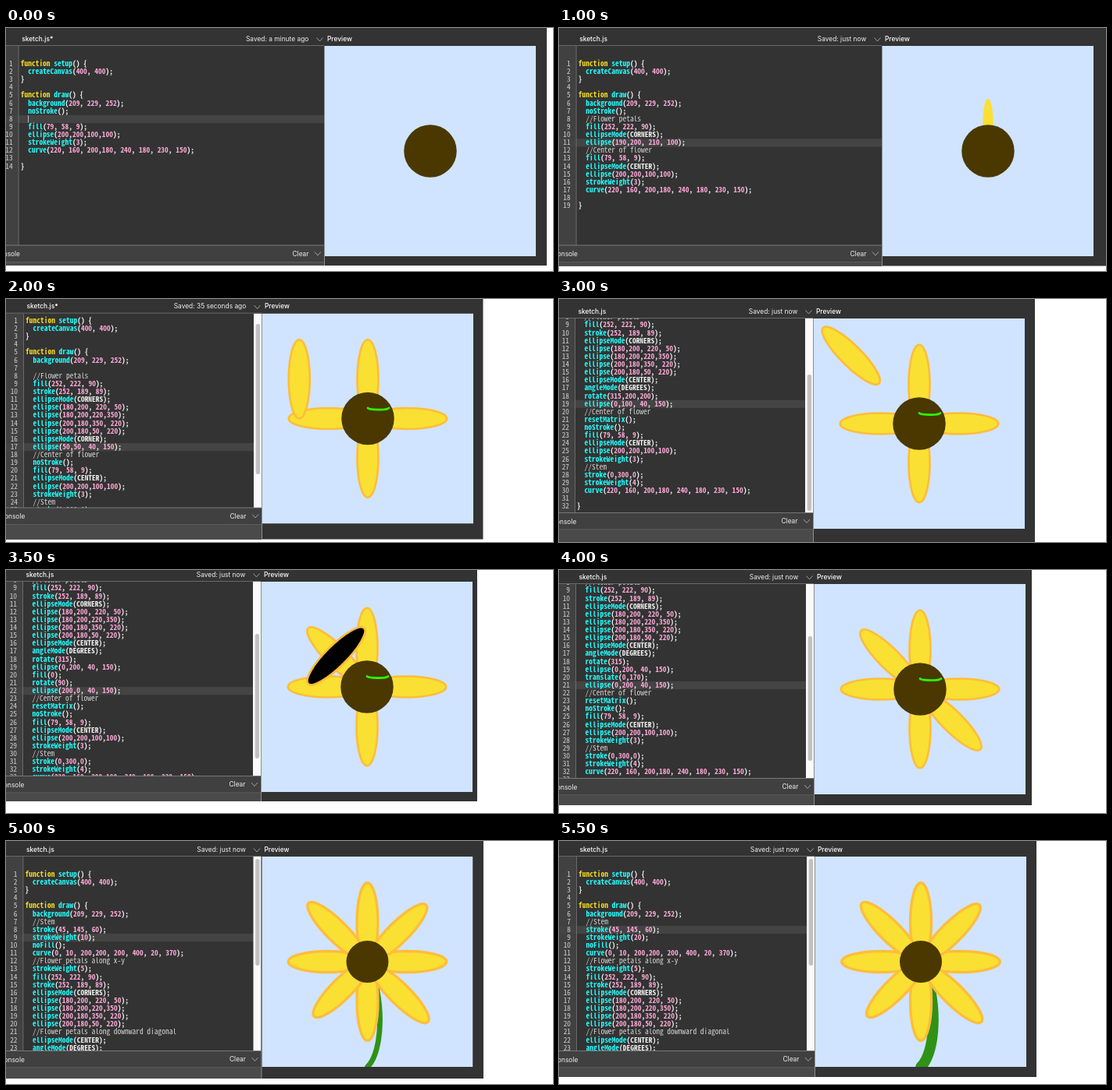
Write an HTML page that moves like this. It is 700 px wide and 312 px high and loops after 6 s.

```html
<!DOCTYPE html>
<html lang="en">
<head>
<meta charset="utf-8">
<title>Flower sketch</title>
<style>
html, body { margin: 0; width: 100%; height: 100%; overflow: hidden; background: #fff; }
#stage {
  --mono: "Noto Sans Mono CJK JP", "Noto Sans Mono CJK SC", "Noto Sans Mono", monospace;
  display: block; width: 700px; height: 312px;
}
.step { visibility: hidden; animation: show 6s step-end infinite; }
@keyframes show {
  0% { visibility: visible; }
  8.3334%, 100% { visibility: hidden; }
}
text { font: 8.4px Inter, "Open Sans", sans-serif; fill: #f0f0f0; }
.title { font-weight: 500; fill: #fff; }
.code, .num { font-family: var(--mono); font-size: var(--size); }
.code { font-weight: 700; }
.num { fill: #d0d0d0; }
.word { fill: #f5dc23; }
.call { fill: #2ff; }
.value { fill: #ffa9d9; }
.note { fill: #d8d8d8; font-weight: 400; }
</style>
</head>
<body>
<svg id="stage" viewBox="0 0 700 312"></svg>
<script>
const PITCH = 10.125, CHAR = 4.725, PANE = 270;
const stage = document.getElementById('stage');

// Colours as the screen shows them
const SHOWN = {
  '209,229,252': '#d0e4ff', '252,222,90': '#fae033', '252,189,89': '#ffbd3b',
  '79,58,9': '#4a3800', '0,300,0': '#2cff00', '45,145,60': '#2f9217', '0': '#000'
};

// Sketch fragments
const yellow = 'fill(252, 222, 90);';
const edge = 'stroke(252, 189, 89);\nellipseMode(CORNERS);';
const cross = ['ellipse(180,200, 220, 50);', 'ellipse(180,200,220,350);',
  'ellipse(200,180,350, 220);', 'ellipse(200,180,50, 220);'];
const petals = ['', '//Flower petals', yellow, edge];
const centerMode = 'ellipseMode(CENTER);';
const degrees = centerMode + '\nangleMode(DEGREES);';
const diagonal = 'ellipse(0,200, 40, 150);';
const heart = size => ['noStroke();', 'fill(79, 58, 9);', centerMode, `ellipse(200,200,${size},${size});`];
const middle = '//Center of flower';
const smile = 'curve(220, 160, 200,180, 240, 180, 230, 150);';
const tail = ['strokeWeight(3);', '//Stem', 'stroke(0,300,0);', 'strokeWeight(4);', smile];
const endTurned = size => [middle, 'resetMatrix();', ...heart(size)];
const down = [degrees, 'rotate(315);', diagonal, 'translate(0,170);', diagonal];
const up = ['translate(100,100);', '//Flower petals along upward diagonal', 'rotate(90);',
  'translate(15,20)', 'ellipse(0,0, 40, 150);', 'ellipse(0,150, 40, 150);'];
const downNote = '//Flower petals along downward diagonal';
const early = (...mid) => ['noStroke();', ...mid, 'ellipse(200,200,100,100);', 'strokeWeight(3);', smile];
const stem = weight => ['//Stem', 'stroke(45, 145, 60);', `strokeWeight(${weight});`, 'noFill();',
  'curve(0, 10, 200,200, 200, 400, 20, 370);', '//Flower petals along x-y', 'strokeWeight(5);',
  yellow, edge, ...cross, downNote, ...down, ...up, ...endTurned(80)];

// x, y: corner of the preview; w, h: window size; bar: scroll thumb top and height
const steps = [
  { x: 408, y: 23, w: 692, h: 305, on: 8, caret: true, saved: 'a minute ago',
    body: early('', 'fill(79, 58, 9);') },
  { x: 413, y: 26, w: 699, h: 311, on: 10, saved: 'just now',
    body: early('//Flower petals', yellow, 'ellipse(200,100, 20, 100);', middle, 'fill(79, 58, 9);') },
  { x: 414, y: 23, w: 700, h: 305.5, on: 11, saved: 'just now',
    body: early('//Flower petals', yellow, 'ellipseMode(CORNERS);', 'ellipse(190,200, 210, 100);',
      middle, 'fill(79, 58, 9);', centerMode) },
  { x: 328, y: 20, w: 608, h: 304, on: 14, scroll: 13.5, bar: [13.5, 203], saved: 'just now',
    body: [...petals, ...cross.slice(0, 3), middle, ...heart(100), ...tail] },
  { x: 328, y: 18.5, w: 610.5, h: 308.5, on: 17, scroll: 13.5, bar: [13.5, 193], saved: '35 seconds ago',
    body: [...petals, ...cross, 'ellipseMode(CORNER);', 'ellipse(50,50, 40, 150);',
      middle, ...heart(100), ...tail] },
  { x: 327, y: 20, w: 608, h: 304, on: 19, scroll: 95.5, bar: [72, 175], saved: 'just now',
    body: [...petals, ...cross, degrees, 'rotate(315);', 'ellipse(50,50, 40, 150);',
      ...endTurned(100), ...tail] },
  { x: 326, y: 25, w: 609, h: 312, on: 19, scroll: 95.5, bar: [72, 175], saved: 'just now',
    body: [...petals, ...cross, degrees, 'rotate(315,200,200);', 'ellipse(0,100, 40, 150);',
      ...endTurned(100), ...tail] },
  { x: 327, y: 15, w: 603, h: 297, on: 22, scroll: 95.5, bar: [67, 160], saved: 'just now',
    body: [...petals, ...cross, degrees, 'rotate(315);', diagonal, 'fill(0);', 'rotate(90);',
      'ellipse(200,0, 40, 150);', ...endTurned(100), ...tail] },
  { x: 327, y: 18, w: 605, h: 302, on: 21, scroll: 95.5, bar: [67, 160], saved: 'just now',
    body: [...petals, ...cross, ...down, ...endTurned(100), ...tail] },
  { x: 326.5, y: 20, w: 612.5, h: 304.5, on: 39, scroll: 177, bar: [104, 137], saved: 'just now',
    body: [...petals, ...cross, downNote, ...down, ...up, ...endTurned(90), ...tail] },
  { x: 327.5, y: 20, w: 611, h: 305, on: 9, scroll: 0, bar: [3, 137], saved: 'just now', body: stem(10) },
  { x: 328, y: 20, w: 611, h: 303, on: 8, scroll: 0, bar: [3, 137], saved: 'just now', body: stem(20) }
];

const rect = (x, y, w, h, fill, more = '') =>
  `<rect x="${x}" y="${y}" width="${w}" height="${h}" fill="${fill}" ${more}/>`;
const label = (x, y, str, more = '') => `<text x="${x}" y="${y}" ${more}>${str}</text>`;
const chevron = (x, y) =>
  `<path d="M${x - 4} ${y - 2}l4 4.5 4-4.5" fill="none" stroke="#aaa" stroke-width=".9"/>`;

function listing(body) {
  const inner = body.join('\n').split('\n').map(s => s && '  ' + s);
  return ['function setup() {', '  createCanvas(400, 400);', '}', '', 'function draw() {',
    '  background(209, 229, 252);', ...inner, '', '}'];
}

// Runs the listed drawing calls; style carries over from the previous pass
function paint(lines) {
  const pen = { fill: '#fff', stroke: 'none', weight: 1, mode: 'CENTER' };
  let out, turn;
  const style = () => `fill="${pen.fill}" stroke="${pen.stroke}" stroke-width="${pen.weight}" transform="${turn}"`;
  const calls = {
    background: (...c) => { out = rect(0, 0, 400, 400, SHOWN[c]); },
    fill: (...c) => { pen.fill = SHOWN[c]; },
    stroke: (...c) => { pen.stroke = SHOWN[c]; },
    noFill: () => { pen.fill = 'none'; },
    noStroke: () => { pen.stroke = 'none'; },
    strokeWeight: w => { pen.weight = w; },
    rotate: a => { turn += `rotate(${a})`; },
    translate: (x, y) => { turn += `translate(${x} ${y})`; },
    resetMatrix: () => { turn = ''; },
    ellipse: (a, b, c, d) => {
      if (pen.mode === 'CORNERS') [a, b, c, d] = [(a + c) / 2, (b + d) / 2, Math.abs(c - a), Math.abs(d - b)];
      if (pen.mode === 'CORNER') { a += c / 2; b += d / 2; }
      out += `<ellipse cx="${a}" cy="${b}" rx="${c / 2}" ry="${d / 2}" ${style()}/>`;
    },
    curve: (a, b, c, d, e, f, g, h) => {
      out += `<path d="M${c} ${d}C${c + (e - a) / 6} ${d + (f - b) / 6} ${e - (g - c) / 6} ${f - (h - d) / 6} ${e} ${f}" stroke-linecap="round" ${style()}/>`;
    }
  };
  for (let pass = 0; pass < 2; pass++) {
    turn = '';
    for (const line of lines) {
      const [, name, args] = line.match(/^\s+(\w+)\((.*)\)/) || [];
      if (name === 'ellipseMode') pen.mode = args;
      else if (calls[name]) calls[name](...(args ? args.split(',').map(Number) : []));
    }
  }
  return out;
}

function tint(token) {
  if (token.startsWith('//')) return 'note';
  if (token === 'function') return 'word';
  if (/^\d/.test(token)) return 'value';
  return /^[a-z]/.test(token) ? 'call' : '';
}

const colour = line => line.trim().replace(/\/\/.*|\w+/g,
  token => `<tspan class="${tint(token)}">${token}</tspan>`);

function editor(s, lines, left, height) {
  const right = s.x - 1;
  const mid = n => 23 + PITCH * (n - 1) - (s.scroll || 0);
  let out = rect(0, 0, left, height, '#414141');
  out += rect(0, mid(s.on) - 5, right, PITCH, '#444');
  out += rect(left - .5, 0, .8, height, '#777');
  lines.forEach((line, i) => {
    const y = mid(i + 1);
    if (y < -8 || y > height + 8) return;
    const indent = line.length - line.trimStart().length;
    out += label(left - 7.4, y + 2.9, i + 1, 'class="num" text-anchor="end"');
    out += label(left + 2.6 + indent * CHAR, y + 2.9, colour(line), 'class="code"');
  });
  if (s.caret) out += rect(left + 12, mid(s.on) - 4.5, .8, 9, '#ddd');
  if (s.bar) {
    out += rect(right - 10, 0, 10, height, '#fafafa');
    out += rect(right - 7.3, s.bar[0], 5.4, s.bar[1], '#c1c1c1', 'rx="2.7"');
  }
  return `<svg x="0" y="${s.y}" width="${right}" height="${height}">${out}</svg>`;
}

function windowAt(s, i) {
  const { x, y, w, h } = s;
  const lines = listing(s.body);
  const left = x - (s.bar ? 305.5 : 391.8);
  const height = s.bar ? 249.5 : 256;
  const base = y + height, right = x - 1;
  let out = rect(0, 0, w, h, '#333');
  out += editor(s, lines, left, height);
  out += rect(0, y - .8, right, .8, '#777');
  out += rect(0, base, right, h - base, '#404040');
  out += rect(0, base - .4, right, .8, '#888');
  out += rect(0, base + 21.5, right, h - base - 21.5, '#4a4a4a');
  out += rect(0, base + 21, right, .7, '#666');
  out += rect(right, y, .9, h - y, '#999');
  out += label(left + 4, y - 6.5, 'sketch.js', 'class="title"');
  if (s.saved !== 'just now') out += `<circle cx="${left + 42}" cy="${y - 11}" r="1.5" fill="#eee"/>`;
  out += label(x - 20.7, y - 6.5, 'Saved: ' + s.saved, 'text-anchor="end"');
  out += chevron(x - 6.5, y - 8.5);
  out += label(x + 3, y - 6.5, 'Preview', 'class="title"');
  out += label(left + 1.8, base + 14, 'Console', 'text-anchor="end"');
  out += label(x - 41.5, base + 13.7, 'Clear');
  out += chevron(x - 9, base + 10.5);
  out += `<svg x="${x}" y="${y}" width="${PANE}" height="${PANE}" viewBox="0 0 400 400">${paint(lines)}</svg>`;
  return `<g class="step" style="animation-delay:${i / 2 - 6}s">${out}</g>`;
}

// Font size that gives one character the advance CHAR
function codeSize() {
  const pen = document.createElement('canvas').getContext('2d');
  pen.font = '100px ' + getComputedStyle(stage).getPropertyValue('--mono');
  return CHAR * 100 / pen.measureText('0').width;
}

stage.style.setProperty('--size', codeSize() + 'px');
stage.innerHTML = steps.map(windowAt).join('');
</script>
</body>
</html>
```
